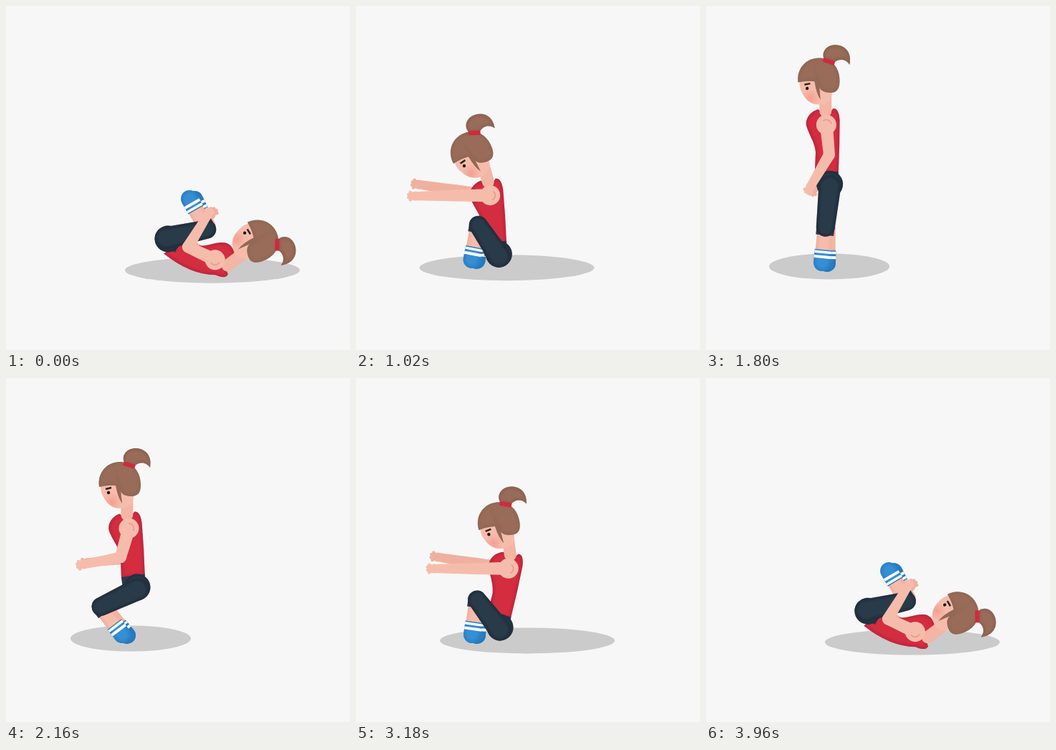
An HTML page with a canvas that plays this animation: 480x480 px, repeating every 3.99 s.

```html
<!DOCTYPE html>
<html lang="en">
<head>
<meta charset="utf-8">
<title>Rolling squat</title>
<style>
html, body { margin: 0; width: 100%; height: 100%; overflow: hidden; background: #f7f7f7; }
canvas { display: block; }
</style>
</head>
<body>
<canvas id="stage" width="480" height="480"></canvas>
<script>
const ctx = document.getElementById('stage').getContext('2d');
const LOOP = 3990;
const SKIN = '#f6bcab', SKIN_EDGE = '#e89c8c', SHIRT = '#d42d40', SHORTS = '#293b49',
      SOCK = '#368fd3', HAIR = '#996b59', TIE = '#cf2a3d';

// Angles are clockwise degrees from upright; elbows and knees follow from hand and foot.
const pose = (hip, lean, neck, tilt, foot, hand, shade) =>
  ({ hipX: hip[0], hipY: hip[1], lean, neck, tilt, footX: foot[0], footY: foot[1],
     handX: hand[0], handY: hand[1], shade });
const floor = [162, 358];
const tuck = pose([226, 325], 114, 66, 73, [256, 269], [281, 292], 288);
const recline = pose([208, 349], 66, 44, 45, [157, 300], [229, 280], 234);
const reach = pose([197, 345], -14, -29, -25, floor, [70, 260], 206);
const squat = pose([183, 293], -8, -20, -3, floor, [68, 208], 190);
const stand = pose([172, 246], -3, -9, 2, floor, [147, 250], 172);
const lower = pose([183, 292], -8, -11, 0, floor, [109, 260], 174);
const sit = pose([201, 348], 8, -12, -8, floor, [109, 266], 239);
const fall = pose([213, 345], 74, 48, 52, [178, 284], [240, 280], 270);

const keys = [[0, tuck], [660, recline], [1100, reach], [1440, squat], [1740, stand], [2160, lower],
              [2450, squat], [2820, reach], [3180, sit], [3560, fall], [LOOP, tuck]];

// Smooth interpolation that never overshoots a key.
function slope(name, i) {
  if (i === 0 || i === keys.length - 1) return 0;
  const rate = j => (keys[j + 1][1][name] - keys[j][1][name]) / (keys[j + 1][0] - keys[j][0]);
  const a = rate(i - 1), b = rate(i);
  return a * b > 0 ? 2 * a * b / (a + b) : 0;
}
function poseAt(t) {
  const i = keys.findLastIndex(k => k[0] <= t);
  const [t0, from] = keys[i], [t1, to] = keys[i + 1];
  const d = t1 - t0, s = (t - t0) / d, r = 1 - s;
  const now = {};
  for (const name in from) {
    now[name] = from[name] * (1 + 2 * s) * r * r + to[name] * (3 - 2 * s) * s * s +
      d * s * r * (slope(name, i) * r - slope(name, i + 1) * s);
  }
  return now;
}

const rad = deg => deg * Math.PI / 180;
const clamp = v => Math.min(1, Math.max(0, v));
const shift = (p, x, y) => ({ x: p.x + x, y: p.y + y });
const polar = (p, deg, d) => shift(p, d * Math.sin(rad(deg)), -d * Math.cos(rad(deg)));
const toward = (a, b, d) => polar(a, angle(a, b) * 180 / Math.PI + 90, d);
const angle = (a, b) => Math.atan2(b.y - a.y, b.x - a.x);
const dist = (a, b) => Math.hypot(b.x - a.x, b.y - a.y);

// Middle joint of a limb with two bones; side picks the bending direction.
function joint(a, b, first, second, side) {
  const d = dist(a, b), fit = Math.max(1, d / (first + second));
  const u = first * fit, v = second * fit;
  const along = (u * u - v * v + d * d) / (2 * d);
  const out = side * Math.sqrt(Math.max(0, u * u - along * along));
  const c = (b.x - a.x) / d, s = (b.y - a.y) / d;
  return shift(a, c * along - s * out, s * along + c * out);
}

function paint(path, color, edge) {
  ctx.fillStyle = color;
  ctx.fill(path);
  if (!edge) return;
  ctx.save();
  ctx.clip(path);
  ctx.strokeStyle = edge;
  ctx.globalAlpha = 0.14;
  for (const w of [10, 7, 4]) { ctx.lineWidth = w; ctx.stroke(path); }
  ctx.restore();
}
function circle(p, r) {
  const path = new Path2D();
  path.arc(p.x, p.y, r, 0, 7);
  return path;
}
function line(a, b, width, color, cap = 'butt') {
  ctx.strokeStyle = color;
  ctx.lineWidth = width;
  ctx.lineCap = cap;
  ctx.beginPath();
  ctx.moveTo(a.x, a.y);
  ctx.lineTo(b.x, b.y);
  ctx.stroke();
}
// Outline around two circles.
function taper(a, ra, b, rb) {
  const dir = angle(a, b), off = Math.acos((ra - rb) / Math.max(dist(a, b), ra));
  const path = new Path2D();
  path.arc(a.x, a.y, ra, dir + off, dir - off + 2 * Math.PI);
  path.arc(b.x, b.y, rb, dir - off, dir + off);
  path.closePath();
  return path;
}
function local(p, angle, draw) {
  ctx.save();
  ctx.translate(p.x, p.y);
  ctx.rotate(angle);
  draw();
  ctx.restore();
}

const shoe = new Path2D('M12 0A12 12 0 0 1-12 0V-18H12Z');

function lowerLeg(knee, foot, sock) {
  const len = dist(foot, knee);
  local(foot, angle(foot, knee) + Math.PI / 2, () => {
    const calf = new Path2D();
    calf.rect(-11, -len, 22, len);
    paint(calf, SKIN, SKIN_EDGE);
    paint(shoe, sock, '#216cae');
    ctx.fillStyle = '#fff';
    ctx.fillRect(-12, -10, 24, 4);
    ctx.fillRect(-12, -16.5, 24, 3.5);
  });
}

function arm(shoulder, hand, color) {
  const elbow = joint(shoulder, hand, 42, 52, -1);
  const aim = angle(elbow, hand);
  paint(taper(shoulder, 9, elbow, 8), color);
  paint(taper(elbow, 8, hand, 6), color);
  paint(circle(shoulder, 14), color);
  for (let f = -0.65; f < 0.7; f += 0.43) {
    const r = 10 - Math.abs(f) * 2;
    line(hand, shift(hand, Math.cos(aim + f) * r, Math.sin(aim + f) * r), 4.5, color, 'round');
  }
  paint(circle(hand, 6.5), color);
}

// The back rounds and the waist folds as bend goes from 0 to 1.
function torso(hip, lean, k, bend) {
  local(hip, rad(lean), () => {
    const p = new Path2D();
    p.moveTo(13 + 8 * bend, -15 + 12 * bend);
    p.quadraticCurveTo(17 + 16 * bend, -52 * k, 19, -88 * k);
    p.quadraticCurveTo(19, -105 * k, 11, -105 * k);
    p.quadraticCurveTo(2, -94 * k, -10, -105 * k);
    p.bezierCurveTo(-21, -103 * k, -31, -92 * k, -27, -80 * k);
    p.bezierCurveTo(-23, -66 * k, -18 + 6 * bend, -60 * k, -17 + 8 * bend, -46 * k);
    p.lineTo(-20 + 18 * bend, -16);
    p.closePath();
    paint(p, SHIRT, '#a5203a');
    ctx.fillStyle = SHORTS;
    ctx.fillRect(-20 + 18 * bend, -17, 33 - 18 * bend, 17);
  });
}

function shorts(hip, lean, knee, foot) {
  line(knee, toward(knee, foot, 11), 25, SHORTS);
  paint(circle(hip, 18.5), SHORTS, '#15222d');
  paint(taper(polar(hip, lean, -3), 15.5, knee, 13), SHORTS, '#15222d');
}

const face = new Path2D('M-27 0C-27 8-27 14-23 20C-18 31-8 37 2 36C14 35 19 30 19 16L10-8Z');
const hair = new Path2D('M-29 6C-32-14-18-29 0-29C18-29 29-15 29 3C29 14 25 19 16 19C9 19 3 17 1 12L3 29Q-3 21-6 4Q-16 3-29 6Z');
const tail = new Path2D('M6-28C1-40 12-49 23-48C37-47 45-36 42-21C37-28 29-30 21-24Z');

function head(center, tilt) {
  local(center, rad(tilt), () => {
    paint(face, SKIN);
    ctx.save();
    ctx.clip(face);
    const blush = ctx.createRadialGradient(-11, 27, 0, -11, 27, 13);
    blush.addColorStop(0, 'rgba(240,130,118,.5)');
    blush.addColorStop(1, 'rgba(240,130,118,0)');
    ctx.fillStyle = blush;
    ctx.fillRect(-30, 10, 36, 34);
    ctx.restore();
    paint(tail, HAIR, '#80584a');
    paint(hair, HAIR, '#8a6251');
    line({ x: 5, y: -27 }, { x: 21, y: -22 }, 6, TIE);
    line({ x: -20, y: 9 }, { x: -12, y: 7 }, 2.5, '#30211f');
    paint(circle({ x: -16, y: 14 }, 2.2), '#1d1719');
  });
}

function draw(t) {
  const now = poseAt(t);
  const hip = { x: now.hipX, y: now.hipY };
  const foot = { x: now.footX, y: now.footY };
  const hand = { x: now.handX, y: now.handY };
  const { lean, tilt, shade } = now;

  const bend = clamp((lean - 66) / 48);
  const shoulder = polar(hip, lean, 83 - 11 * bend);
  const skull = polar(shoulder, now.neck, 65);
  const knee = joint(hip, foot, Math.min(60, 40 + dist(hip, foot) / 4), 49, 1);
  const spread = clamp((dist(shoulder, hand) - 60) / 45) * (hip.y - 265) * 0.2;

  ctx.fillStyle = '#f7f7f7';
  ctx.fillRect(0, 0, 480, 480);

  // The shadow widens once the body leans away from the feet.
  ctx.fillStyle = '#cbcbcb';
  ctx.beginPath();
  ctx.ellipse(shade, 363.5 + (shade - 174) * 0.045, 84 + 38 * clamp((shade - 188) / 22), 18, 0, 0, 7);
  ctx.fill();

  arm(shift(shoulder, -4, 0), shift(hand, 5, -spread), '#f0b09f');
  lowerLeg(shift(knee, 3, -1), shift(foot, 7, 1), '#2b7fc3');
  lowerLeg(knee, foot, SOCK);
  torso(hip, lean, 1 - 0.08 * bend, bend);
  shorts(hip, lean, knee, foot);
  line(polar(skull, tilt + 155, 23), polar(shoulder, lean, 19), 17, '#f3b5a4', 'round');
  head(skull, tilt);

  arm(shoulder, hand, SKIN);
  const aim = angle(shoulder, hand);
  ctx.strokeStyle = SKIN_EDGE;
  ctx.lineWidth = 1.8;
  ctx.lineCap = 'round';
  ctx.beginPath();
  ctx.arc(shoulder.x, shoulder.y, 7, aim + 2.3, aim + 4.2);
  ctx.stroke();
}

const start = performance.now();
function frame() {
  draw((performance.now() - start) % LOOP);
  requestAnimationFrame(frame);
}
frame();
</script>
</body>
</html>
```
